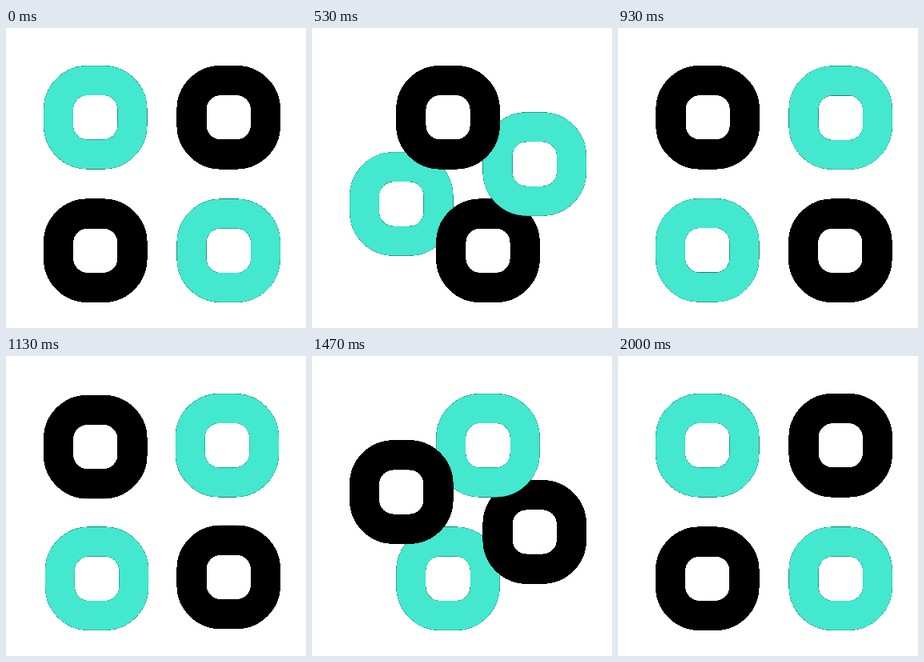
Recreate the animation shown at these times as an HTML page. Size 375 px wide and 375 px high, loop 2230 ms.

```html
<!DOCTYPE html>
<html lang="en">
<head>
<meta charset="utf-8">
<title>Four rings</title>
<style>
  html, body {
    margin: 0;
    width: 100%;
    height: 100%;
    overflow: hidden;
    background: #fff;
  }
  svg {
    display: block;
    width: 375px;
    height: 375px;
  }

  rect {
    width: 92.45px;
    height: 92.45px;
    rx: 36.4px;
    fill: none;
    animation: travel 2s both paused;
    animation-delay: var(--delay, 0s);
  }

  /* Hard-edged base with a slightly thinner, smooth face on top */
  .base {
    stroke: #000;
    stroke-width: 37.25px;
    shape-rendering: crispEdges;
  }
  .face {
    stroke: #000;
    stroke-width: 36.75px;
  }
  .teal .base { stroke: #175c52; }
  .teal .face { stroke: #43e8cf; }

  @keyframes travel {
    0%   { x: -129.475px; y: -129.475px; animation-timing-function: cubic-bezier(.8, 0, .2, 1); }
    50%  { x: -129.475px; y: 37.025px; animation-timing-function: cubic-bezier(.8, 0, .2, 1); }
    100% { x: 37.025px; y: 37.025px; }
  }
</style>
</head>
<body>
  <!-- One square track around the origin, turned in quarters for each ring -->
  <svg viewBox="-195 -195 375 375">
    <g class="teal"><rect class="base"/><rect class="face"/></g>
    <g transform="rotate(-90)"><rect class="base"/><rect class="face"/></g>
    <g class="teal" transform="rotate(180)"><rect class="base"/><rect class="face"/></g>
    <g transform="rotate(90)"><rect class="base"/><rect class="face"/></g>
  </svg>

<script>
  const LOOP = 2230, FPS = 30, LAST = 60;
  const root = document.documentElement;
  const start = performance.now();
  let shown = 0;

  // Holds each pose for one step at 30 per second, on a 10 ms clock
  function tick() {
    const t = (performance.now() - start) % LOOP;
    const clock = Math.floor(t / 10) * 10;
    const step = Math.min(LAST, Math.floor((clock + 4) * FPS / 1000));
    if (step !== shown) {
      shown = step;
      root.style.setProperty("--delay", `${-step / FPS}s`);
    }
    requestAnimationFrame(tick);
  }
  tick();
</script>
</body>
</html>
```
